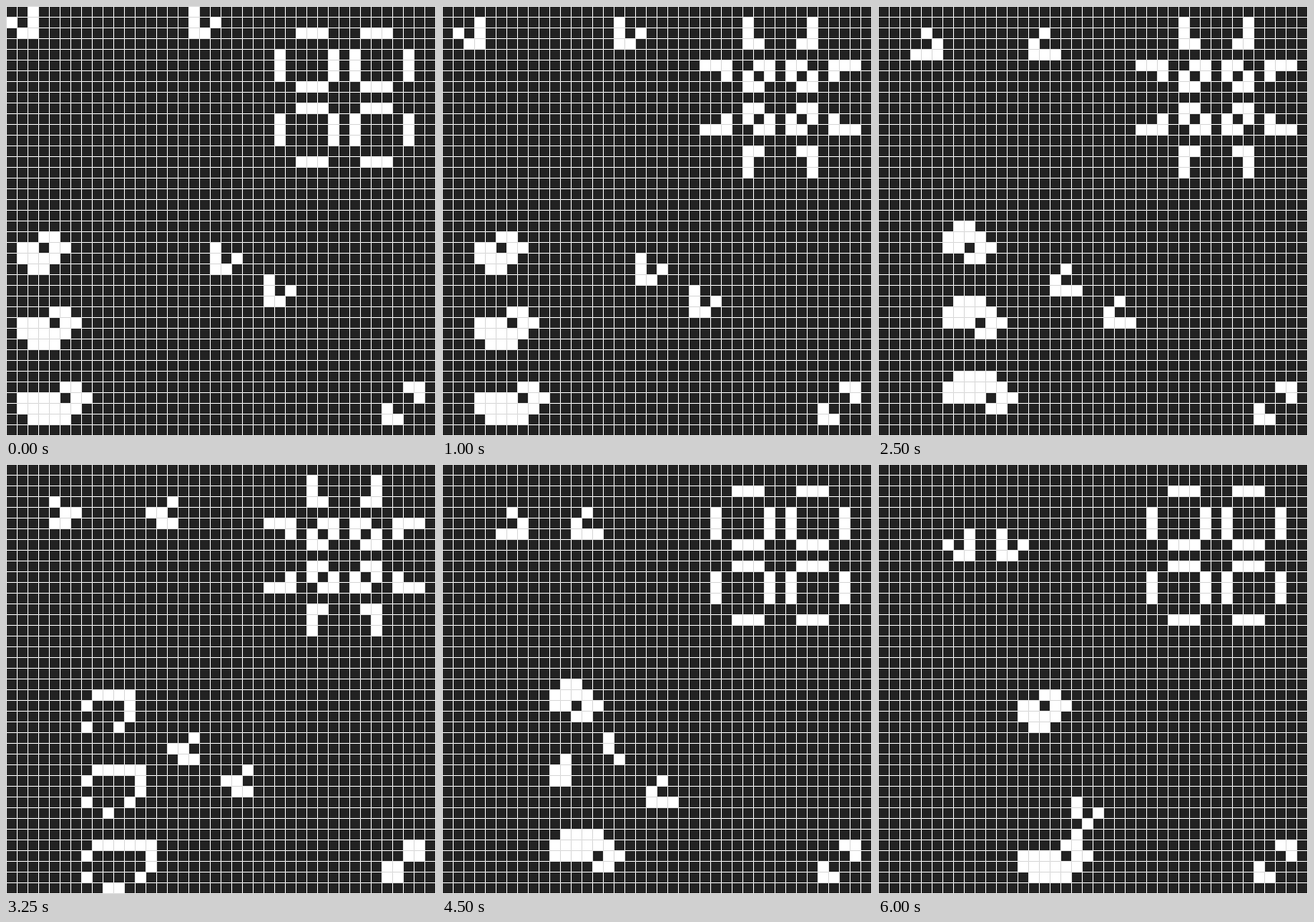
These frames come from a looping animation (481 by 481 pixels, 6250 ms). An HTML page with a canvas:

```html
<!DOCTYPE html>
<html lang="en">
<head>
<meta charset="utf-8">
<title>Game of Life</title>
<style>
  html, body { margin: 0; width: 100%; height: 100%; overflow: hidden; background: #222; }
  canvas { display: block; }
</style>
</head>
<body>
<canvas id="board" width="481" height="481"></canvas>
<script>
const SIZE = 40, PITCH = 12, STEP = 250, GENERATIONS = 25;
const GRID = '#ddd', DEAD = '#222', ALIVE = '#fff';

const gliderRight = ['..O', 'O.O', '.OO'];
const gliderLeft = ['O..', 'O.O', 'OO.'];
const beacon = ['..OO', '...O', 'O...', 'OO..'];

// Spaceship heading right; body is 2, 3 or 4 cells long
const ship = n => [
  '.'.repeat(n) + 'OO',
  'O'.repeat(n) + '.OO',
  'O'.repeat(n + 2),
  '.' + 'O'.repeat(n)
];

const bars = '..OOO...OOO..', sides = 'O....O.O....O', gap = '.'.repeat(13);
const half = [bars, gap, sides, sides, sides, bars];
const pulsar = [...half, gap, ...half.slice().reverse()];

// pattern, column, row
const layout = [
  [gliderRight, 0, 0],
  [gliderLeft, 17, 0],
  [gliderLeft, 19, 22],
  [gliderLeft, 24, 25],
  [pulsar, 25, 2],
  [ship(2), 1, 21],
  [ship(3), 1, 28],
  [ship(4), 1, 35],
  [beacon, 35, 35]
];

function seed() {
  const cells = new Uint8Array(SIZE * SIZE);
  for (const [rows, x, y] of layout)
    rows.forEach((row, r) => [...row].forEach((ch, c) => {
      if (ch === 'O') cells[(y + r) * SIZE + x + c] = 1;
    }));
  return cells;
}

// Cells beyond the edge count as dead
function neighbours(cells, x, y) {
  let sum = 0;
  for (let dy = -1; dy <= 1; dy++)
    for (let dx = -1; dx <= 1; dx++) {
      const nx = x + dx, ny = y + dy;
      if ((dx || dy) && nx >= 0 && ny >= 0 && nx < SIZE && ny < SIZE)
        sum += cells[ny * SIZE + nx];
    }
  return sum;
}

const evolve = cells => cells.map((alive, i) => {
  const n = neighbours(cells, i % SIZE, Math.floor(i / SIZE));
  return n === 3 || (alive && n === 2) ? 1 : 0;
});

const history = [seed()];
while (history.length < GENERATIONS) history.push(evolve(history[history.length - 1]));

const ctx = document.getElementById('board').getContext('2d');

function draw(cells) {
  ctx.fillStyle = GRID;
  ctx.fillRect(0, 0, 481, 481);
  cells.forEach((alive, i) => {
    ctx.fillStyle = alive ? ALIVE : DEAD;
    ctx.fillRect(i % SIZE * PITCH + 1, Math.floor(i / SIZE) * PITCH + 1, PITCH - 1, PITCH - 1);
  });
}

let shown = 0;
draw(history[0]);
const start = performance.now();

function tick() {
  const generation = Math.floor((performance.now() - start) / STEP) % GENERATIONS;
  if (generation !== shown) draw(history[shown = generation]);
  requestAnimationFrame(tick);
}
requestAnimationFrame(tick);
</script>
</body>
</html>
```
